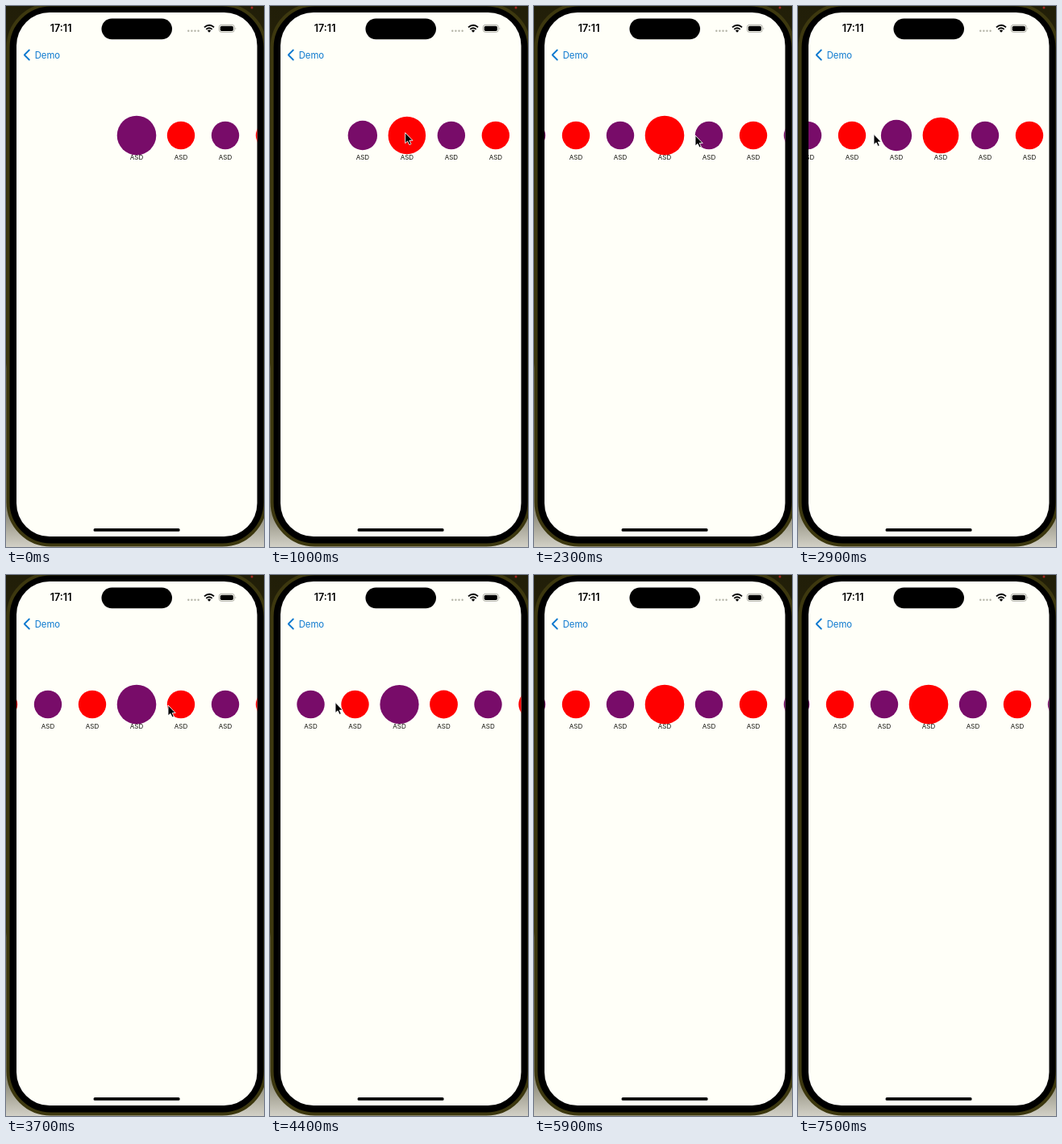
Animation, 320 px wide and 669 px high, one loop 7600 ms. Source, as an HTML page:

```html
<!DOCTYPE html>
<html lang="en">
<head>
<meta charset="utf-8">
<title>Carousel</title>
<style>
  html, body { margin: 0; width: 100%; height: 100%; overflow: hidden; background: #2b2812; }
  svg { display: block; width: 100vw; height: 100vh; font-family: Inter, Roboto, sans-serif; }
</style>
</head>
<body>
<svg viewBox="0 0 320 669">
  <defs>
    <linearGradient id="desk" x2="0" y2="1">
      <stop offset="0" stop-color="#211e08"/>
      <stop offset=".66" stop-color="#3c370f"/>
      <stop offset=".67" stop-color="#69664f"/>
      <stop offset=".94" stop-color="#8f8d7c"/>
      <stop offset="1" stop-color="#d2d0c6"/>
    </linearGradient>
    <clipPath id="screen"><rect x="13" y="8" width="298.5" height="648" rx="41"/></clipPath>
  </defs>
  <rect width="320" height="669" fill="url(#desk)"/>
  <circle cx="305" cy="2" r="1.5" fill="#a32420"/>
  <rect x="2.5" y="-1.5" width="319" height="668" rx="53" fill="#000" stroke="#3d380f" stroke-width="4"/>
  <rect x="13" y="8" width="298.5" height="648" rx="41" fill="#fffff8"/>

  <text x="54.8" y="32.3" font-size="12.5" font-weight="600">17:11</text>
  <rect x="118.5" y="15.5" width="87.5" height="25.7" rx="12.85"/>
  <g fill="#b5b5a8">
    <circle cx="226.3" cy="30.8" r="1.2"/><circle cx="230.4" cy="30.8" r="1.2"/>
    <circle cx="234.5" cy="30.8" r="1.2"/><circle cx="238.6" cy="30.8" r="1.2"/>
  </g>
  <g fill="none" stroke="#000" stroke-width="1.9">
    <path d="M246 26.4Q252 20.9 258 26.4"/>
    <path d="M248.3 28.9Q252 25.5 255.7 28.9"/>
  </g>
  <path d="M252 32.8L249.8 30.5Q252 28.7 254.2 30.5Z"/>
  <rect x="264.3" y="23.3" width="19" height="9" rx="2.8" fill="none" stroke="#999990" stroke-width=".8"/>
  <rect x="265.7" y="24.7" width="16.2" height="6.2" rx="1.7"/>
  <path d="M284.6 26.4q1.5 1.4 0 2.8z" fill="#999990"/>

  <path d="M28.8 54.5L22.8 60.5L28.8 66.5" fill="none" stroke="#0b78cf" stroke-width="1.8" stroke-linecap="round" stroke-linejoin="round"/>
  <text x="35.7" y="64.5" font-size="11.3" fill="#0b78cf">Demo</text>

  <g id="carousel" clip-path="url(#screen)"></g>
  <rect x="108.5" y="646" width="107.2" height="3.8" rx="1.9"/>
  <path id="cursor" d="M0 0V13L3 10.4L5.2 15L7.3 14L5.2 9.6H9.2Z" stroke="#fff" stroke-width=".9" stroke-linejoin="round"/>
</svg>
<script>
const LOOP = 7600, STEP = 100, CENTER = 162, GAP = 55, COUNT = 14;
const carousel = document.getElementById('carousel');
const cursor = document.getElementById('cursor');

const make = (tag, attrs) => {
  const node = document.createElementNS('http://www.w3.org/2000/svg', tag);
  for (const key in attrs) node.setAttribute(key, attrs[key]);
  carousel.append(node);
  return node;
};
const items = Array.from({ length: COUNT }, (_, i) => {
  const label = make('text', { y: 190.4, 'font-size': 8, 'text-anchor': 'middle', fill: '#14140f' });
  label.textContent = 'ASD';
  const disc = make('circle', { cy: 160, fill: i % 2 ? '#ff0000' : '#780c69' });
  return { label, disc };
});

const smooth = p => p * p * (3 - 2 * p);
const settle = p => 1 - (1 - p) ** 3;

// Each key: time, values, easing used to reach it
const scrollKeys = [
  [700, [0]], [1500, [149], smooth], [2000, [165], settle],
  [2400, [165]], [2900, [260], smooth], [3500, [330], settle],
  [3900, [330]], [4400, [441.5], smooth], [5100, [495], settle]
];
const cursorKeys = [
  [600, [218, 160]], [700, [218, 160]], [1500, [59, 149.5], smooth],
  [1800, [59, 149.5]], [2300, [200, 160], smooth], [2400, [200, 160]],
  [2900, [94, 158.5], smooth], [3100, [85, 158], settle],
  [3600, [201, 161], smooth], [3900, [201, 161]],
  [4400, [81, 157.5], smooth], [4700, [60, 157], settle]
];

function sample(keys, t) {
  const next = keys.findIndex(key => key[0] > t);
  if (next < 0) return keys[keys.length - 1][1];
  if (next === 0) return keys[0][1];
  const [start, from] = keys[next - 1];
  const [end, to, ease = smooth] = keys[next];
  const p = ease((t - start) / (end - start));
  return from.map((v, i) => v + (to[i] - v) * p);
}

function render(t) {
  const [scroll] = sample(scrollKeys, t);
  items.forEach(({ label, disc }, i) => {
    const x = CENTER + i * GAP - scroll;
    const focus = Math.max(0, 1 - Math.abs(x - CENTER) / GAP);
    label.setAttribute('x', x);
    disc.setAttribute('cx', x);
    disc.setAttribute('r', 17.2 + 7.1 * focus);
  });
  const [x, y] = sample(cursorKeys, t);
  cursor.setAttribute('transform', `translate(${x} ${y})`);
  cursor.setAttribute('visibility', t >= 600 && t < 5200 ? 'visible' : 'hidden');
}

const origin = performance.now();
function tick() {
  const t = (performance.now() - origin) % LOOP;
  render(Math.floor(t / STEP) * STEP);
  requestAnimationFrame(tick);
}
tick();
</script>
</body>
</html>
```
